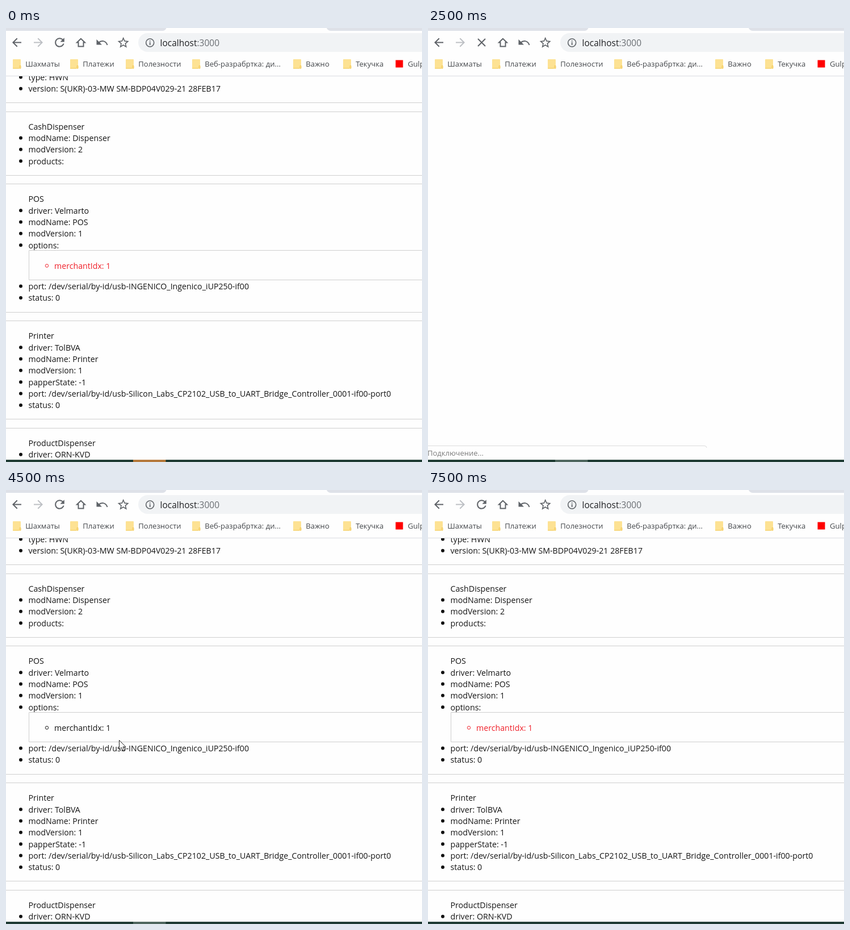
An HTML page for the animation above (8000 ms loop, 733x764 px).

```html
<!DOCTYPE html>
<html lang="ru">
<head>
<meta charset="utf-8">
<title>Device state page</title>
<style>
  html, body { margin: 0; width: 100%; height: 100%; overflow: hidden; background: #fefefe; }
  svg { display: block; width: 733px; height: 764px; }
  text { font-family: "Open Sans", "Noto Sans", sans-serif; font-size: 14.2px; fill: #151515; }
  #bookmarks text { font-size: 13.1px; fill: #45484c; }
  .url { font-size: 15.5px; fill: #202124; }
  .url tspan { fill: #6a6e73; }
  #status text { font-size: 13px; fill: #7b7b7b; }
  .icon { fill: #5f6368; }
  .line { fill: none; stroke: #5f6368; stroke-width: 2; }
  .rule { fill: none; stroke: #cfcfcf; }
</style>
</head>
<body>
<svg id="stage" viewBox="0 0 733 764">
  <defs>
    <clipPath id="view"><rect y="85" width="733" height="675"/></clipPath>
    <path id="arrow" d="M20 11H7.83l5.59-5.59L12 4l-8 8 8 8 1.41-1.41L7.83 13H20z"/>
  </defs>
  <rect width="733" height="764" fill="#fefefe"/>
  <g id="page" clip-path="url(#view)"></g>

  <path id="tab" d="M0 0H282.5Q281 5 275 5H0Z"/>
  <path d="M565 0Q567 5 573 5H733V0Z" fill="#dee1e8"/>
  <rect x="233" y="9" width="540" height="33" rx="16.5" fill="#f1f3f5"/>
  <path d="M0 84.5H733" stroke="#dadce0"/>

  <use href="#arrow" class="icon" x="7" y="13.5"/>
  <use href="#arrow" fill="#bdc0c4" transform="translate(69 13.5) scale(-1 1)"/>
  <circle id="hover" cx="94.5" cy="25.5" r="16" fill="#dedfe1"/>
  <path id="reload" class="icon" transform="translate(82 13) scale(1.04)" d="M17.65 6.35C16.2 4.9 14.21 4 12 4c-4.42 0-7.99 3.58-7.99 8s3.57 8 7.99 8c3.73 0 6.84-2.55 7.73-6h-2.08c-.82 2.33-3.04 4-5.65 4-3.31 0-6-2.69-6-6s2.69-6 6-6c1.66 0 3.14.69 4.22 1.78L13 11h7V4z"/>
  <path id="stop" class="line" d="M88 19L101 32M101 19L88 32"/>
  <path class="line" d="M132 18.8l-7 6.7h2.5v7h9v-7h2.5z"/>
  <path class="icon" d="M159.5 20V29.5H169Z"/>
  <path class="line" stroke-width="2.5" d="M163 26C168 21 176 22 178.5 30"/>
  <path class="icon" transform="translate(194.7 13.7)" d="M22 9.24l-7.19-.62L12 2 9.19 8.63 2 9.24l5.46 4.73L5.82 21 12 17.27 18.18 21l-1.63-7.03zM12 15.4l-3.76 2.27 1-4.28-3.32-2.88 4.38-.38L12 6.1l1.71 4.04 4.38.38-3.32 2.88 1 4.28z"/>
  <circle class="line" style="stroke-width:1.6" cx="253.7" cy="26" r="7"/>
  <path class="line" style="stroke-width:1.7" d="M253.7 25V30M253.7 22V23.8"/>
  <text class="url" x="271.5" y="31.7">localhost<tspan>:3000</tspan></text>
  <g id="bookmarks"></g>

  <g id="status">
    <path d="M0 735H487Q491 735 491 739V760H0Z" fill="#fefefe"/>
    <path d="M0 735.5H487Q491 735.5 491 739" fill="none" stroke="#dcdcdc"/>
    <text x="-1" y="753">Подключение...</text>
  </g>
  <rect y="760" width="733" height="4" fill="#1f3c34"/>
  <rect id="task" x="224" y="760" width="57.5" height="4"/>
  <path id="cursor" d="M.5 .5V16.7L4.3 13.2L6.9 19.3L9.5 18.2L7 12.2H12Z" fill="#fff" stroke="#222"/>
</svg>
<script>
const LOOP = 8000;
const $ = id => document.getElementById(id);

function add(parent, tag, attrs, text) {
  const el = document.createElementNS("http://www.w3.org/2000/svg", tag);
  for (const key in attrs) el.setAttribute(key, attrs[key]);
  if (text) el.textContent = text;
  parent.appendChild(el);
  return el;
}

const page = $("page");
const LINE = 20.35;

// Lists of a section; the title, if any, has no bullet.
function list(y, title, items) {
  if (title) {
    add(page, "text", { x: 39.5, y }, title);
    y += LINE;
  }
  items.forEach((item, i) => {
    const base = y + i * LINE;
    add(page, "circle", { cx: 26, cy: base - 5.4, r: 3, fill: "#111" });
    add(page, "text", { x: 39.5, y: base }, item);
  });
}

list(91.8, "", ["type: HWN", "version: S(UKR)-03-MW SM-BDP04V029-21 28FEB17"]);
list(178.5, "CashDispenser", ["modName: Dispenser", "modVersion: 2", "products:"]);
list(306.2, "POS", ["driver: Velmarto", "modName: POS", "modVersion: 1", "options:"]);
list(460, "", ["port: /dev/serial/by-id/usb-INGENICO_Ingenico_iUP250-if00", "status: 0"]);
list(547.2, "Printer", [
  "driver: TolBVA", "modName: Printer", "modVersion: 1", "papperState: -1",
  "port: /dev/serial/by-id/usb-Silicon_Labs_CP2102_USB_to_UART_Bridge_Controller_0001-if00-port0",
  "status: 0"
]);
list(735.8, "ProductDispenser", ["driver: ORN-KVD"]);

for (const y of [131, 147, 259, 274, 500, 515, 688, 704])
  add(page, "path", { class: "rule", d: `M0 ${y + .5}H733` });
add(page, "path", { class: "rule", d: "M734 391.5H40.5V443.5H734" });
const ring = add(page, "circle", { cx: 72, cy: 418.5, r: 2.7, fill: "none" });
const option = add(page, "text", { x: 85, y: 424 }, "merchantIdx: 1");

const marks = $("bookmarks");
const folders = [
  [12, "Шахматы"], [113, "Платежи"], [211, "Полезности"],
  [328, "Веб-разрабртка: ди..."], [506, "Важно"], [594, "Текучка"]
];
for (const [x, name] of folders) {
  add(marks, "rect", { x, y: 55, width: 14, height: 16.5, rx: 1, fill: "#fde293" });
  add(marks, "path", { d: `M${x} 71H${x + 11}M${x + 12} 66.5h2v4.5h-2z`, fill: "none", stroke: "#f3ca58" });
  add(marks, "text", { x: x + 22.2, y: 67.8 }, name);
}
add(marks, "rect", { x: 686.5, y: 56.5, width: 13, height: 13, fill: "#f00" });
add(marks, "text", { x: 708, y: 67.8 }, "Gulp");

// Pointer places, each held from its time until the next one.
const stops = [
  [0], [500, 358, 47], [1000, 269, 0], [1500, 97, 12], [2000, 162, 72], [2500],
  [3000, 724, 514], [3500, 151, 400], [4000, 178, 410], [4500, 199, 440],
  [5000, 202, 438], [5500, 157, 418], [6000]
];

const show = (el, on) => el.setAttribute("visibility", on ? "visible" : "hidden");

function draw(t) {
  const within = (from, to) => t >= from && t < to;
  const blank = within(2500, 3000);
  const [, x, y] = stops.findLast(stop => stop[0] <= t);
  const color = within(2500, 5000) ? "#151515" : "#f0202a";

  show($("cursor"), x !== undefined);
  if (x !== undefined) $("cursor").setAttribute("transform", `translate(${x} ${y})`);
  show(page, !blank);
  show($("reload"), !blank);
  show($("stop"), blank);
  show($("hover"), within(1500, 2500));
  show($("status"), within(2000, 3500));
  show($("task"), !within(1000, 1500) && t < 7500);
  $("task").setAttribute("fill", t < 500 ? "#b5793c" : "#4f675f");
  $("tab").setAttribute("fill", within(1000, 1500) ? "#eceef2" : "#dee1e8");
  option.style.fill = color;
  ring.setAttribute("stroke", color);
}

let start;
function tick(now) {
  start ??= now;
  draw((now - start) % LOOP);
  requestAnimationFrame(tick);
}
draw(0);
requestAnimationFrame(tick);
</script>
</body>
</html>
```
